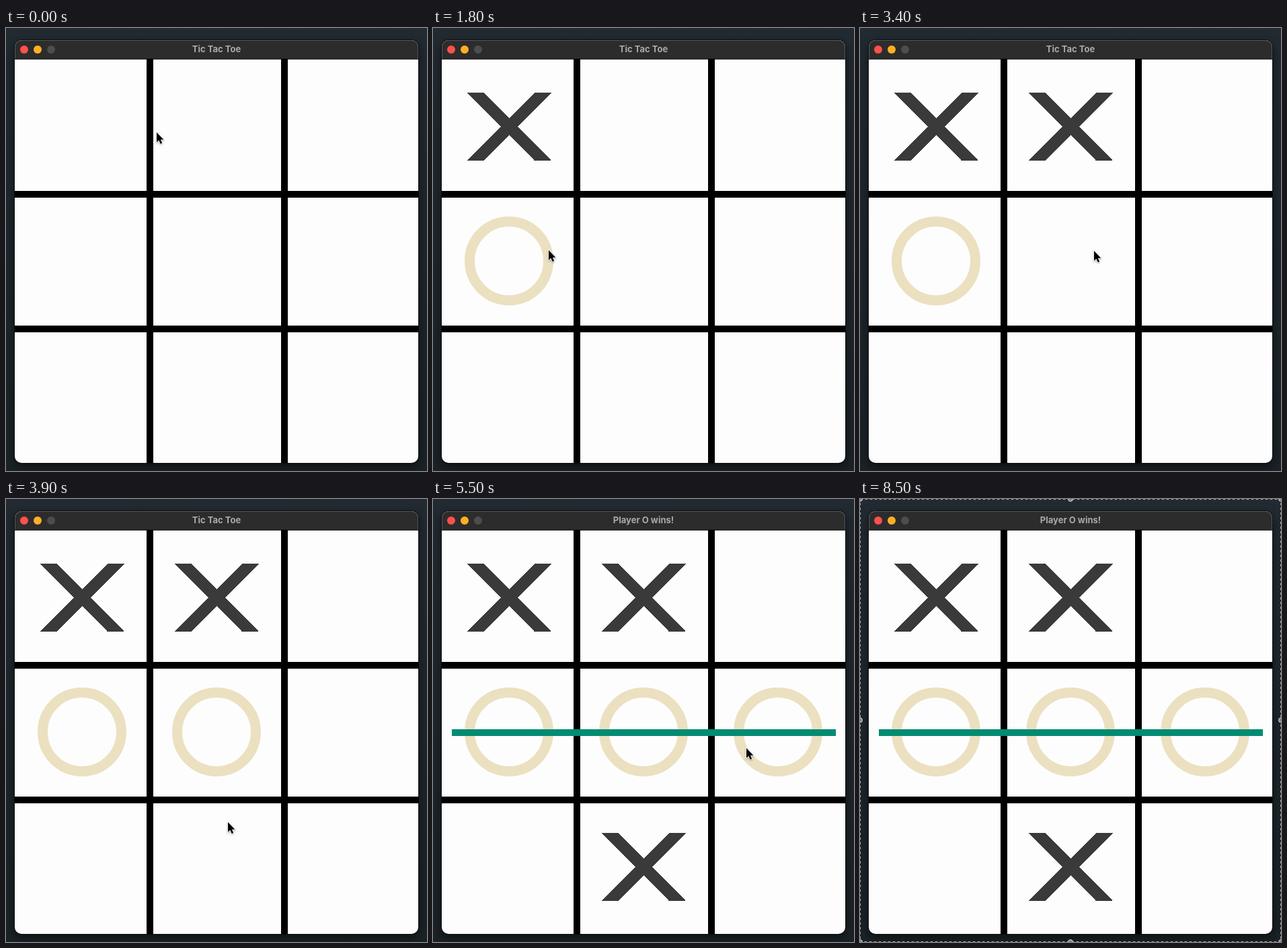
An HTML page for the animation above (8.9 s loop, 626 by 658 pixels).

```html
<!DOCTYPE html>
<html lang="en">
<head>
<meta charset="utf-8">
<title>Tic Tac Toe</title>
<style>
  html, body { margin: 0; width: 100%; height: 100%; overflow: hidden; background: #1d252a; }
  svg { display: block; width: 626px; height: 658px; }
  #win { filter: drop-shadow(0 6px 8px rgba(0, 0, 0, .5)); }
  #title { font: 700 13px Inter, "Open Sans", sans-serif; fill: #aaa; text-anchor: middle; }
  .o { fill: none; stroke: #ebe0c0; stroke-width: 15; }
  .x { fill: #3a3a3a; shape-rendering: crispEdges; }
  #cursor { filter: drop-shadow(0 1px 1px rgba(0, 0, 0, .35)); }
</style>
</head>
<body>
<svg viewBox="0 0 626 658">
  <defs>
    <linearGradient id="desk" x2="0" y2="1">
      <stop stop-color="#222b32"/><stop offset="1" stop-color="#1b2328"/>
    </linearGradient>
    <clipPath id="frame"><rect x="13" y="18" width="600" height="628" rx="10"/></clipPath>
    <path id="x" class="x" d="M-62-50h25L63 51H38ZM38-50h25L-37 51h-25Z"/>
    <circle id="o" class="o" r="58.5"/>
  </defs>
  <rect width="626" height="658" fill="url(#desk)"/>
  <g id="win">
    <rect x="12" y="17" width="602" height="630" rx="11" fill="#0b0d0f"/>
    <g clip-path="url(#frame)">
      <rect x="13" y="18" width="600" height="628" fill="#fdfdfd"/>
      <rect x="13" y="18" width="600" height="28" fill="#2d2c2d"/>
      <rect x="13.5" y="18.5" width="599" height="60" rx="9.5" fill="none" stroke="#58595a" clip-path="inset(0 0 33px 0)"/>
      <path d="M13 46.2h600" stroke="#000"/>
      <path d="M214 46v600M414 46v600M13 247h600M13 447h600" stroke="#000" stroke-width="10"/>
    </g>
  </g>
  <circle cx="27" cy="32" r="6" fill="#fe514c"/>
  <circle cx="47" cy="32" r="6" fill="#fdb024"/>
  <circle cx="67" cy="32" r="6" fill="#4d4d4d"/>
  <text id="title" x="313" y="36"></text>
  <g id="marks"></g>
  <path id="strike" d="M28 347h571" stroke="#008c72" stroke-width="10"/>
  <path id="cursor" d="M0 0V14.8L3.3 11.7L5.7 17L8.2 15.9L5.9 10.8H10.4Z" fill="#000" stroke="#fff" stroke-width="1.6" paint-order="stroke"/>
  <g id="select">
    <rect x=".5" y=".5" width="625" height="657" fill="none" stroke="#101416"/>
    <rect x=".5" y=".5" width="625" height="657" fill="none" stroke="#a5a8aa" stroke-dasharray="4 3"/>
  </g>
</svg>
<script>
const $ = id => document.getElementById(id);
const LOOP = 8900, WIN = 5500, HIDE = 7000, SELECT = 7400;

// time, shape, column, row
const moves = [
  [700, 'x', 0, 0], [1600, 'o', 0, 1], [2800, 'x', 1, 0],
  [3500, 'o', 1, 1], [4000, 'x', 1, 2], [WIN, 'o', 2, 1]
];

// time, x, y of the pointer tip
const path = [
  [300, 224, 155], [600, 168, 158], [800, 172, 162], [1000, 211, 196],
  [1200, 204, 238], [1500, 165, 318], [1800, 172, 330], [2100, 277, 335],
  [2400, 352, 335], [2700, 328, 176], [2900, 326, 182], [3300, 346, 325],
  [3400, 348, 331], [3600, 344, 345], [3900, 330, 480], [4100, 330, 482],
  [4400, 439, 388], [4700, 466, 370]
];

function add(parent, tag, attrs) {
  const el = document.createElementNS('http://www.w3.org/2000/svg', tag);
  for (const k in attrs) el.setAttribute(k, attrs[k]);
  return parent.appendChild(el);
}

const marks = moves.map(([, shape, col, row]) =>
  add($('marks'), 'use', { href: '#' + shape, x: 113 + 200 * col, y: 146 + 200 * row }));

for (const x of [0, 313, 626])
  for (const y of [0, 328.5, 658])
    if (x !== 313 || y !== 328.5)
      add($('select'), 'circle', { cx: x, cy: y, r: 3.5, fill: '#85888a', stroke: '#d5d7d8' });

function pointer(t) {
  const i = path.findIndex(p => p[0] > t);
  if (i === 0) return path[0].slice(1);
  if (i < 0) return path[path.length - 1].slice(1);
  const [t0, x0, y0] = path[i - 1], [t1, x1, y1] = path[i];
  const u = (t - t0) / (t1 - t0), k = u * u * (3 - 2 * u);
  return [x0 + (x1 - x0) * k, y0 + (y1 - y0) * k];
}

function show(el, on) { el.style.display = on ? '' : 'none'; }

function draw(now) {
  const t = Math.floor(now % LOOP / 100) * 100;
  marks.forEach((el, i) => show(el, t >= moves[i][0]));
  show($('strike'), t >= WIN);
  show($('cursor'), t < HIDE);
  show($('select'), t >= SELECT);
  $('title').textContent = t >= WIN ? 'Player O wins!' : 'Tic Tac Toe';
  $('cursor').setAttribute('transform', `translate(${pointer(t).map(Math.round)})`);
}

const start = performance.now();
function tick() {
  draw(performance.now() - start);
  requestAnimationFrame(tick);
}
tick();
</script>
</body>
</html>
```
